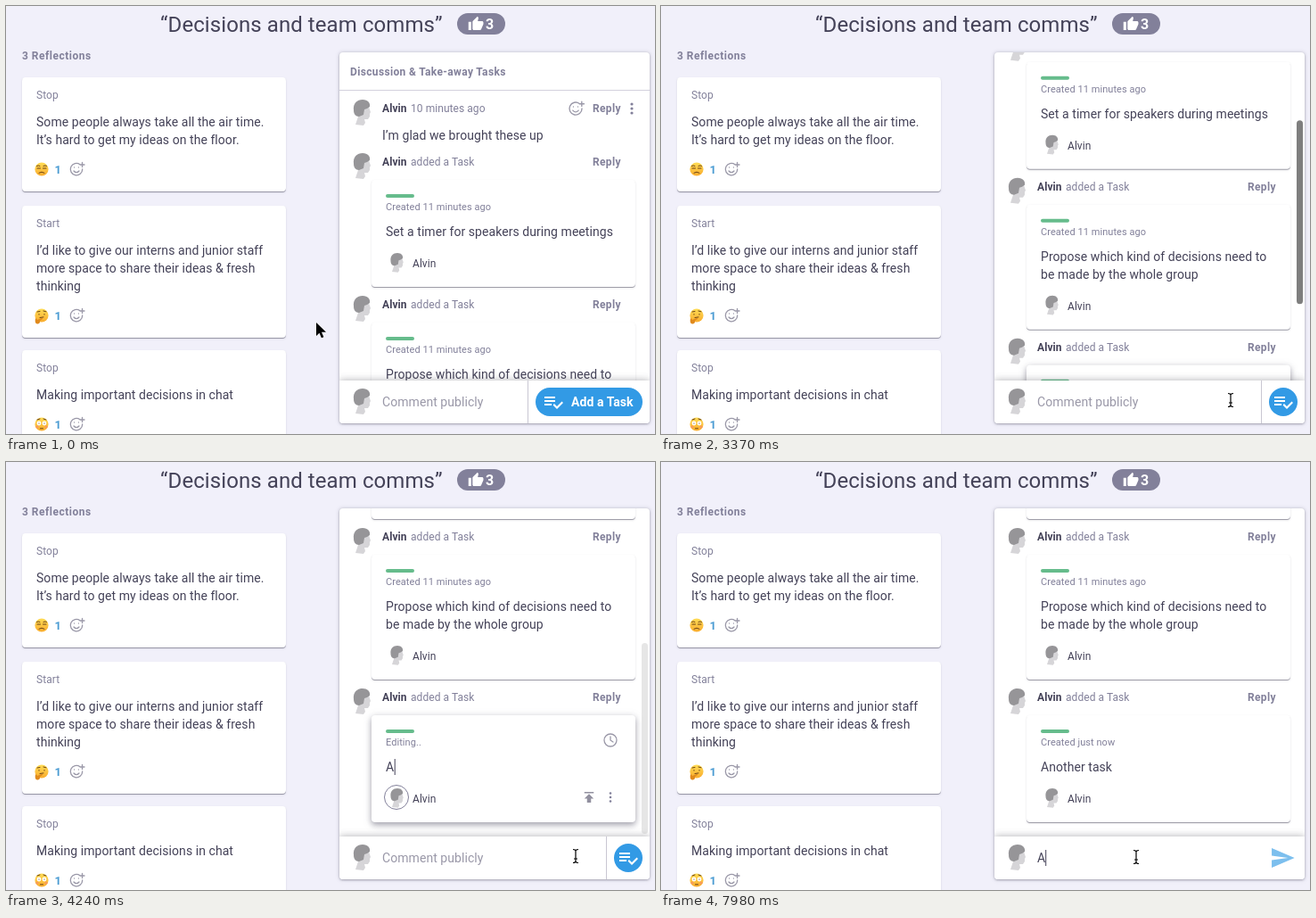
These frames come from a looping animation (728x480 px, 8000 ms). An HTML page:

```html
<!DOCTYPE html>
<html lang="en">
<head>
<meta charset="utf-8">
<title>Team discussion</title>
<style>
html, body { margin: 0; width: 100%; height: 100%; overflow: hidden; background: #f1f0fa; }
svg { display: block; }
text { font-family: Roboto, "Noto Sans", sans-serif; letter-spacing: .06px; white-space: pre; }
.card { fill: #fff; filter: drop-shadow(0 1px .6px rgba(68,66,88,.45)) drop-shadow(0 1px 1px rgba(68,66,88,.15)); }
.panel { fill: #fff; filter: drop-shadow(0 1px 1px rgba(68,66,88,.35)) drop-shadow(0 0 2px rgba(68,66,88,.25)); }
.bar { fill: #fff; filter: drop-shadow(0 0 4px rgba(40,40,50,.38)); }
.line { fill: none; stroke: #9a98a8; stroke-width: 1.3; stroke-linecap: round; stroke-linejoin: round; }
.face { fill: none; stroke: #6b4316; stroke-linecap: round; }
</style>
</head>
<body>
<svg id="stage" width="728" height="480" viewBox="0 0 728 480"></svg>
<script>
const INK = '#444258', SLATE = '#82809a', SKY = '#329ae5', NAME = 'Alvin';

// y is the middle of the capitals
const text = (x, y, s, size = 14, fill = INK, more = '') =>
  `<text x="${x}" y="${y + size * .35}" font-size="${size}" fill="${fill}" ${more}>${s}</text>`;
const bold = (x, y, s, size = 12, fill = SLATE, gap = .35) =>
  text(x, y, s, size, fill, `font-weight="600" style="letter-spacing:${gap}px"`);
const box = (x, y, w, h, r, attrs) =>
  `<rect x="${x}" y="${y}" width="${w}" height="${h}" rx="${r}" ${attrs}/>`;
const at = (x, y, body, k = 1) => `<g transform="translate(${x} ${y}) scale(${k})">${body}</g>`;
const group = (id, body) => `<g id="${id}">${body}</g>`;
const use = (id, x, y, k) => at(x, y, `<use href="#${id}"/>`, k);
const dots = (x, y, gap, r) => [-gap, 0, gap].map(d =>
  `<circle cx="${x}" cy="${y + d}" r="${r}" fill="${SLATE}"/>`).join('');
const caret = id => `<rect id="${id}" width="1" height="18" fill="${INK}"/>`;

const defs = `<defs>
  <linearGradient id="sun" x2="0" y2="1"><stop stop-color="#ffdc55"/><stop offset="1" stop-color="#f9ac2e"/></linearGradient>
  <clipPath id="panelClip">${box(374, 52, 348, 416, 4, '')}</clipPath>
  <clipPath id="viewClip">${box(374, 52, 348, 368, 4, '')}</clipPath>
  <clipPath id="pillClip">${box(594, 428, 120, 32, 16, 'id="pillMask"')}</clipPath>
  <g id="head">
    <path fill="#d6d5d8" d="M13 9l6-1 2 6-1 2v3l-2 3h-4l1 4-2 3-9-1 3-9z"/>
    <path fill="#969598" d="M2 12C1 4 6 0 12 0s9 4 8 8l-3 2-3 1-1 6-5 2C4 19 2 16 2 12z"/>
  </g>
  <g id="react" class="line">
    <path d="M4 -5.3A6.7 6.7 0 1 0 6.7 0M-3 2q3 3.4 6 0M-2.4 -2v.1M2.4 -2v.1M6.5 -7.5v5M4 -5h5"/>
  </g>
  <path id="thumb" d="M1 21h4V9H1v12zm22-11c0-1.1-.9-2-2-2h-6.3l1-4.6v-.3c0-.4-.2-.8-.5-1.1L14.2 1 7.6 7.6C7.2 8 7 8.5 7 9v10c0 1.1.9 2 2 2h9c.8 0 1.5-.5 1.8-1.2l3-7c.1-.3.2-.5.2-.8z" fill="#fff"/>
  <path id="check" d="M14 10H2v2h12v-2zm0-4H2v2h12V6zM2 16h8v-2H2v2zm19.5-4.5L23 13l-7 7-4.5-4.5L13 14l3 3z" fill="#fff"/>
</defs>`;

const faces = [
  '<path class="face" d="M-5.5-3.6q2-1 3.5 0M2-3.6q2-1 3.5 0M-5-1h3.5M1.5-1H5M-3 4.2q3-2.2 6 0"/>',
  '<path class="face" d="M-5-4l3-.5M2-5l3 .8M-3-1.5v.6M3-1.5v.6M-2 2.5l4-.6"/><path d="M-7 8c-1-5 1-6 2-3l5-2q2 0 1 1l-3 2c1 3-3 5-5 2z" fill="#e08a1c"/>',
  '<g fill="#fff"><circle cx="-3" cy="-1" r="2.4"/><circle cx="3" cy="-1" r="2.4"/></g><g fill="#f79a5c"><circle cx="-5" cy="3" r="1.6"/><circle cx="5" cy="3" r="1.6"/></g><path class="face" d="M-3-1v.2M3-1v.2M-1.5 4.8h3M-5-5l3-1M5-5l-3-1"/>'
];

function reflection(y, h, label, lines, face) {
  const last = y + 50 + 20 * (lines.length - 1), ry = last + 33;
  return box(18, y, 296, h, 4, 'class="card"') + text(34, y + 20, label, 12, SLATE) +
    lines.map((s, i) => text(34, y + 50 + 20 * i, s)).join('') +
    at(40, ry, '<circle r="7.600" fill="url(#sun)"/>' + faces[face]) +
    bold(54.5, ry, '1', 13, '#4a9bd3', 0) + use('react', 79, ry);
}

// header row of a thread item; y is the text line
const item = (y, what) => use('head', 388, y - 10) + bold(422, y, NAME, 12, INK, .06) + what +
  bold(658, y, 'Reply');
const added = y => item(y, text(454, y, 'added a Task', 12, SLATE));

function task(id, y, lines, tools = '') {
  const end = y + 78 + 20 * (lines.length - 1);
  return added(y) + box(410, y + 20, 296, end + 42 - y, 4, `class="card" id="${id}Card"`) +
    box(426, y + 36, 32, 4, 2, 'fill="#66bc8c"') +
    text(426, y + 50, 'Created 11 minutes ago', 11, SLATE, `id="${id}Meta"`) +
    lines.map((s, i) => text(426, y + 78 + 20 * i, s, 14, INK, `id="${id}Line${i}"`)).join('') +
    group(id + 'Foot', use('head', 430, end + 24, .75) + text(456, end + 36, NAME, 12) + tools);
}

const footTools = group('footTools',
  `<circle cx="438" cy="627" r="13.5" fill="none" stroke="${SLATE}"/>` +
  at(645, 618, `<path d="M5 4v2h14V4zm0 10h4v6h6v-6h4l-7-7z" fill="#92909f"/>`, .75) +
  dots(678, 627, 4.5, 1.3));

const editTools = group('blank', text(426, 593, 'Describe what “Done” looks like', 14, '#c6c4cf')) +
  caret('taskCaret') +
  at(678, 563, '<path class="line" d="M7 0A7 7 0 1 1 -7 0A7 7 0 1 1 7 0M0-4v4l3 2"/>');

const thread = bold(386, 74, 'Discussion &amp; Take-away Tasks') +
  box(374, 94, 348, 1, 0, 'fill="#d3d1de"') +
  item(115, text(454, 115, '', 12, SLATE, 'id="age"')) +
  use('react', 639, 115, 1.05) + dots(702, 115, 5, 1.6) +
  text(422, 145, 'I’m glad we brought these up') +
  task('timer', 175, ['Set a timer for speakers during meetings']) +
  task('scope', 335, ['Propose which kind of decisions need to', 'be made by the whole group']) +
  group('fresh', task('new', 515, [''], footTools) + group('editTools', editTools));

const footer = box(374, 420, 348, 48, 0, 'class="bar"') + use('head', 388, 429) +
  text(422, 444, '', 14, INK, 'id="comment"') + caret('noteCaret') +
  group('action', box(585, 420, 1, 48, 0, 'id="divider" fill="#c9c7d2"') +
    box(594, 428, 120, 32, 16, `id="pill" fill="${SKY}"`) +
    `<g clip-path="url(#pillClip)">` +
    group('label', use('check', 0, 432) + bold(32, 444, 'Add a Task', 14, '#fff', .06)) + '</g>') +
  group('send', at(682.6, 429.3, '<path d="M2 21L23 12 2 3v7l15 2-15 2z" fill="#7cbfee"/>', 1.22));

const cursors =
  group('arrow', '<path d="M0 0v15l3.5-3.3 2.4 5.6 2.5-1.1-2.4-5.4H11z" stroke="#fff" paint-order="stroke"/>') +
  group('hand', '<path d="M-1.6 1.2a1.6 1.6 0 0 1 3.2 0v5.2c0-1.6 2.8-1.6 2.9.2.2-1.3 2.7-1.2 2.8.5.3-1 2.4-.8 2.4.9v4c0 2-1.2 3-1.6 5.5h-7c-.5-2-4-5-5.2-7.2-.8-1.5 1-2.6 2.5-.6z" fill="#fff" stroke="#000" stroke-width="1.2"/><path d="M2.5 11v4M5 11v4M7.3 11v4" stroke="#000"/>') +
  group('beam', ['#fff" stroke-width="3', '#000" stroke-width="1.2'].map(s =>
    `<path fill="none" d="M-3-7.5q3 0 3 2v11q0 2-3 2M3-7.5q-3 0-3 2M3 7.5q-3 0-3-2M-2 3h4" stroke="${s}"/>`).join(''));

document.getElementById('stage').innerHTML = defs +
  text(173, 20.7, '“Decisions and team comms”', 24, INK, 'style="letter-spacing:.08px"') +
  box(506, 8, 54, 24, 12, `fill="${SLATE}"`) + use('thumb', 518, 11, .76) + bold(538, 20.4, '3', 16, '#fff', 0) +
  bold(18, 56, '3 Reflections', 12, SLATE, .5) +
  reflection(80, 128, 'Stop', ['Some people always take all the air time.', 'It’s hard to get my ideas on the floor.'], 0) +
  reflection(224, 148, 'Start', ['I’d like to give our interns and junior staff', 'more space to share their ideas &amp; fresh', 'thinking'], 1) +
  reflection(386, 112, 'Stop', ['Making important decisions in chat'], 2) +
  box(374, 52, 348, 416, 4, 'class="panel"') +
  `<g clip-path="url(#viewClip)">${group('scroll', thread)}</g>` +
  `<g clip-path="url(#panelClip)">${footer}</g>` +
  box(713, 173, 7, 206, 3.5, 'id="thumbBar" fill="#7e7e7e"') + group('mouse', cursors);

const $ = id => document.getElementById(id);
const show = (id, on) => $(id).style.display = on ? '' : 'none';
const set = (id, attrs) => { for (const k in attrs) $(id).setAttribute(k, attrs[k]); };
const move = (id, x, y) => set(id, { transform: `translate(${x} ${y})` });
const ramp = (t, a, b) => Math.max(0, Math.min(1, (t - a) / (b - a)));
const ease = p => p * p * (3 - 2 * p);

const path = [[780, 348, 355], [1250, 697, 444], [1520, 639, 442], [6160, 639, 442],
  [6400, 695, 440], [6560, 704, 410], [6920, 585, 442], [7390, 533, 443]];

function mouseAt(t) {
  let [, x, y] = path[0];
  for (let i = 1; i < path.length; i++) {
    const [t0, x0, y0] = path[i - 1], [t1, x1, y1] = path[i], p = ease(ramp(t, t0, t1));
    x += (x1 - x0) * p;
    y += (y1 - y0) * p;
  }
  return [x, y];
}

function drawThread(t) {
  const editing = t < 5690;
  const opened = ease(ramp(t, 3230, 3470)), ended = ease(ramp(t, 4070, 4190));
  move('scroll', 0, -210 * opened - 41 * ended);
  $('age').textContent = `${t < 3200 ? 10 : 11} minutes ago`;
  show('fresh', t >= 3230);
  show('editTools', editing);
  show('footTools', editing);

  const typed = 'Another task'.slice(0, t < 4130 ? 0 : 1 + Math.floor((t - 4130) / 120));
  $('newLine0').textContent = typed;
  $('newMeta').textContent = editing
    ? 'Editing' + '.'.repeat(Math.floor(Math.max(0, t - 2700) / 250) % 4) : 'Created just now';
  show('blank', !typed);
  set('taskCaret', { x: 426.5 + (typed ? $('newLine0').getComputedTextLength() : 0), y: 584 });

  // the empty editor is one line taller
  const extra = typed ? 0 : 20;
  set('newCard', { height: 120 + extra });
  move('newFoot', 0, extra);

  const lift = 1 - ramp(t, 5690, 5810);
  $('newCard').style.filter = lift
    ? `drop-shadow(0 ${1 + 2 * lift}px ${1 + 2 * lift}px rgba(68,66,88,.4)) drop-shadow(0 ${lift}px ${1 + 3 * lift}px rgba(68,66,88,.15))` : '';

  set('thumbBar', {
    y: 52 + 121 * opened + 30 * ended,
    height: 206 + 8 * ended,
    opacity: ramp(t, 3230, 3300) * (1 - ramp(t, 4120, 4270))
  });
}

function drawFooter(t) {
  const fold = t < 3200 ? 0 : ramp(t, 3150, 3300), left = 594 + 88 * fold;
  const note = t >= 7920 ? 'A' : '';
  $('comment').textContent = note || 'Comment publicly';
  set('comment', { fill: note ? INK : '#9a98a8' });
  show('noteCaret', t >= 7240 && t < 7740 || note);
  set('noteCaret', { x: 422 + (note ? $('comment').getComputedTextLength() : 0), y: 435 });
  show('action', !note);
  show('send', note);
  set('divider', { x: left - 9 });
  for (const id of ['pill', 'pillMask']) set(id, { x: left, width: 714 - left });
  move('label', left + 8 - 4 * fold, 0);
  return left;
}

function drawMouse(t, left) {
  const [x, y] = mouseAt(t);
  const kind = x > left && x < 714 && y > 428 ? 'hand' : y > 420 && x > 414 ? 'beam' : 'arrow';
  for (const id of ['arrow', 'hand', 'beam']) show(id, id === kind);
  move('mouse', x, y);
}

function frame(now) {
  const t = now % 8000;
  drawThread(t);
  drawMouse(t, drawFooter(t));
  requestAnimationFrame(frame);
}
requestAnimationFrame(frame);
</script>
</body>
</html>
```
